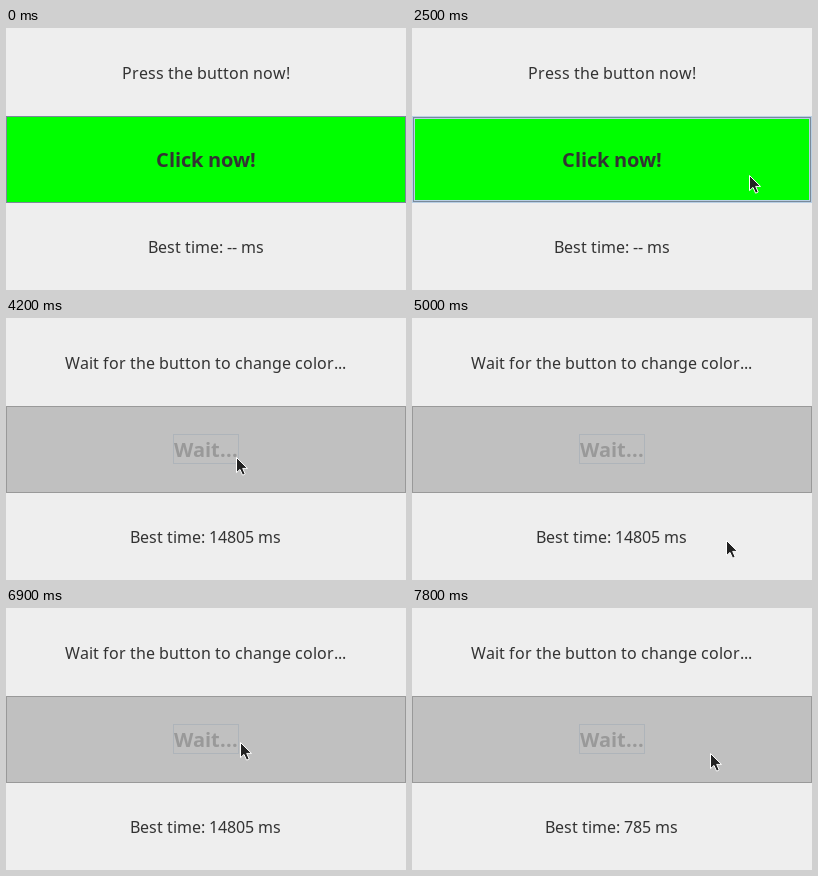
These frames come from a looping animation (400 px wide and 262 px high, 8 s). An HTML page:

```html
<!DOCTYPE html>
<html lang="en">
<head>
<meta charset="utf-8">
<title>Reaction time</title>
<style>
  html, body { margin: 0; width: 100%; height: 100%; overflow: hidden; background: #eee; }
  svg { display: block; width: 400px; height: 262px; }
  text { font: 16px "Noto Sans", sans-serif; fill: #333; white-space: pre; }
  #caption { font-weight: bold; font-size: 20px; }
  rect { shape-rendering: crispEdges; }
  .line { fill: none; stroke-width: 1; }
</style>
</head>
<body>
<svg viewBox="0 0 400 262">
  <rect width="400" height="262" fill="#eee"/>
  <rect id="face" y="88" width="400" height="87"/>
  <rect id="edge" class="line" x=".5" y="88.5" width="399" height="86"/>
  <g id="hover" class="line">
    <rect x=".5" y="88.5" width="399" height="86" stroke="#b8cfe5"/>
    <rect x="1.5" y="89.5" width="397" height="84" stroke="#7a8a99"/>
    <rect x="2.5" y="90.5" width="395" height="82" stroke="#b8cfe5"/>
  </g>
  <path id="sunk" d="M0 89.5H400M1.5 90V175" class="line" stroke="#7a8a99"/>
  <rect id="focus" class="line" y="116.5" height="29"/>
  <text id="prompt" y="51"></text>
  <text id="caption" y="139"></text>
  <text id="best" y="225"></text>
  <path id="cursor" d="M.5 .5V15.6L4 12.4L6.6 18.2L9.2 17L6.7 11.4H11.5Z"
        fill="#222" stroke="#fff" stroke-width="1" stroke-linejoin="round"/>
</svg>
<script>
const LOOP = 8000, STEP = 100;
const $ = id => document.getElementById(id);
const pen = document.createElement("canvas").getContext("2d");

const GO = { face: "#0f0", edge: "#7a8a99", ink: "#333", ring: "#a6c8b4",
             prompt: "Press the button now!", caption: "Click now!" };
const DOWN = { ...GO, face: "#b8cfe5", sunk: true };
const WAIT = { face: "#c0c0c0", edge: "#999", ink: "#999", ring: "#aeb4ba", focus: true,
               prompt: "Wait for the button to change color...", caption: "Wait..." };

// [start, look, best time]
const states = [
  [0, GO, "--"],
  [2500, { ...GO, hover: true }, "--"],
  [3500, DOWN, "--"],
  [3600, WAIT, "14805"],
  [7000, { ...GO, focus: true }, "14805"],
  [7800, WAIT, "785"]
];

// [time, x, y] of the pointer tip
const path = [
  [2500, 337, 147], [2800, 215, 122], [4100, 215, 122], [4700, 306, 226],
  [4800, 306, 226], [5000, 314, 222], [5400, 267, 216], [5500, 267, 216],
  [5800, 209, 167], [5900, 209, 167], [6100, 209, 164], [6400, 209, 164],
  [6700, 234, 134], [7200, 234, 134], [7500, 298, 145], [LOOP, 298, 145]
];

function pointer(t) {
  const i = path.findIndex(k => k[0] > t);
  const [t0, x0, y0] = path[i - 1], [t1, x1, y1] = path[i];
  const p = (t - t0) / (t1 - t0);
  return [x0 + (x1 - x0) * p, y0 + (y1 - y0) * p].map(Math.round);
}

// Centres text on whole-pixel glyph advances; returns its width.
function put(id, str, font) {
  const el = $(id);
  pen.font = font + ' "Noto Sans", sans-serif';
  const widths = [...str].map(c => Math.round(pen.measureText(c).width));
  const total = widths.reduce((a, b) => a + b, 0);
  let x = Math.floor((400 - total) / 2);
  const xs = widths.map(w => (x += w) - w);
  el.setAttribute("x", xs.join(" "));
  el.textContent = str;
  return total;
}

const show = (id, on) => $(id).setAttribute("visibility", on ? "visible" : "hidden");

let current;
function setState(state) {
  if (state === current) return;
  current = state;
  const [, look, best] = state;
  put("prompt", look.prompt, "16px");
  put("best", `Best time: ${best} ms`, "16px");
  const w = put("caption", look.caption, "bold 20px");
  $("caption").style.fill = look.ink;
  $("face").setAttribute("fill", look.face);
  $("edge").setAttribute("stroke", look.edge);
  $("focus").setAttribute("stroke", look.ring);
  $("focus").setAttribute("x", Math.floor((400 - w) / 2) - 0.5);
  $("focus").setAttribute("width", w + 1);
  show("hover", look.hover);
  show("sunk", look.sunk);
  show("focus", look.focus);
}

function draw(now) {
  const t = Math.floor((now % LOOP) / STEP) * STEP;
  setState(states.filter(s => s[0] <= t).pop());
  const seen = t >= path[0][0];
  show("cursor", seen);
  if (seen) $("cursor").setAttribute("transform", `translate(${pointer(t)})`);
}

const start = performance.now();
function tick() {
  draw(performance.now() - start);
  requestAnimationFrame(tick);
}
tick();
</script>
</body>
</html>
```
